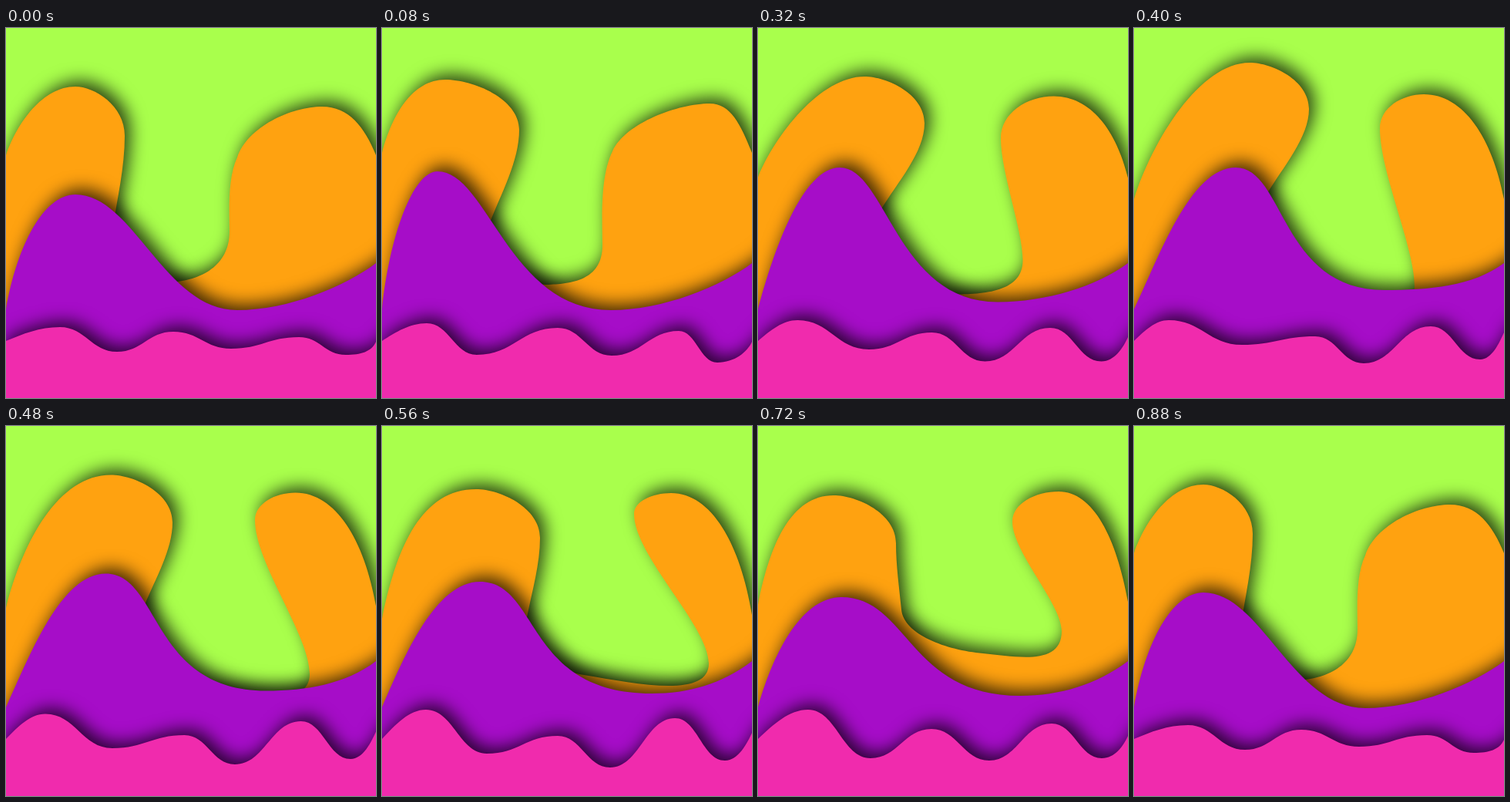
Animation of 480x480 px, one loop 960 ms. Source, as an HTML page:

```html
<!DOCTYPE html>
<html lang="en">
<head>
<meta charset="utf-8">
<title>Paper waves</title>
<style>
html, body { margin: 0; width: 100%; height: 100%; overflow: hidden; background: #a9ff4c; }
svg { display: block; width: 100vw; height: 100vh; }
path { filter: drop-shadow(7px -7px 11px rgba(0, 0, 0, .74)); }
</style>
</head>
<body>
<svg viewBox="0 0 480 480">
  <path id="back" fill="#ffa210"/>
  <path id="mid" fill="#a60dc8"/>
  <path id="front" fill="#f02bad"/>
</svg>
<script>
const STEP = 80, STEPS = 12;

// Closes an edge of cubic curves below the stage.
const sheet = (y0, curves, y1) =>
  `M-30 520 L-30 ${y0 + 50} L0 ${y0} C${curves.join(' ')} L510 ${y1 - 25} V520 Z`;

// left y, bulge, crest, overhang, inner turn, valley, corner, neck, second crest, right y
const backPoses = [
  [165, .47, 90, 76, 154, 140, 138, 262, 222, 329, 290, 264, 300, 168, 410, 102, 165],
  [162, .52, 82, 67, 178, 132, 139, 255, 214, 333, 286, 282, 299, 160, 425, 98, 162],
  [165, .4, 126, 81, 205, 142, 145, 258, 210, 331, 323, 268, 311, 156, 391, 91, 167],
  [222, .43, 150, 45, 227, 105, 172, 216, 260, 360, 364, 335, 319, 130, 376, 86, 222],
  [250, .57, 122, 82, 205, 145, 188, 248, 262, 323, 424, 308, 327, 114, 375, 87, 245],
  [232, .56, 98, 90, 179, 152, 186, 238, 292, 295, 394, 266, 330, 124, 390, 85, 228]
];

function back([ya, k, tx, ty, rx, ry, vx, vy, bx, by, cx, cy, lx, ly, sx, sy, ye]) {
  const lean = .4 * (rx - vx);
  const slope = .25 + (cy - by) * .0055;
  const tilt = 1.3 * Math.max(0, lx - cx);
  const inB = .45 * (bx - vx), outB = .42 * (cx - bx);
  return sheet(ya, [
    .16 * tx, ya - k * (ya - ty), tx - k * tx, ty, tx, ty,
    tx + .38 * (rx - tx), ty, rx, ry - .62 * (ry - ty), rx, ry,
    rx, ry + .33 * (vy - ry), vx + lean, vy - .33 * (vy - ry), vx, vy,
    vx - lean, vy + .57 * (by - vy), bx - inB, by - slope * inB, bx, by,
    bx + outB, by + slope * outB, cx, cy + 46, cx, cy,
    cx, cy - .25 * (cy - ly), lx - tilt, ly + .28 * (cy - ly), lx, ly,
    lx + tilt, ly - .6 * (ly - sy), sx - Math.min(40, .5 * (sx - lx)), sy, sx, sy,
    sx + .5 * (480 - sx), sy, 465, ye - .58 * (ye - sy), 480, ye
  ], ye + 100);
}

// crest, valley, handle share on either side of the slope
const midPoses = [
  [90, 216, 300, 366, .36, .45],
  [72, 186, 297, 366, .29, .59],
  [80, 181, 297, 371, .26, .585],
  [132, 181, 325, 340, .33, .7],
  [127, 202, 350, 347, .35, .74],
  [108, 222, 340, 350, .375, .625]
];

function mid([tx, ty, bx, by, p, q]) {
  const w = bx - tx;
  return sheet(365, [
    tx * tx / 550, 240 + .45 * tx, .55 * tx, ty, tx, ty,
    tx + p * w, ty, bx - q * w, by, bx, by,
    bx + .37 * (480 - bx), by, 440, 335, 480, 305
  ], 305);
}

// three crests and troughs in turn, then right y
const frontPoses = [
  [70, 388, 144, 420, 217, 394, 292, 416, 380, 401, 441, 424, 407],
  [58, 383, 123, 424, 228, 389, 298, 425, 385, 393, 435, 434, 407],
  [58, 379, 148, 423, 216, 390, 291, 430, 373, 391, 442, 435, 407],
  [45, 379, 140, 411, 235, 400, 298, 435, 385, 387, 449, 430, 395],
  [57, 368, 136, 425, 228, 402, 296, 443, 380, 379, 445, 434, 398],
  [65, 368, 146, 431, 225, 393, 300, 434, 381, 386, 446, 431, 402]
];

function front(p) {
  let [x, y] = p;
  const ye = p[12];
  const curves = [.31 * x, 406 - .5 * (406 - y), .62 * x, y, x, y];
  for (let i = 2; i < 12; i += 2) {
    const h = .45 * (p[i] - x);
    curves.push(x + h, y, p[i] - h, p[i + 1], p[i], p[i + 1]);
    [x, y] = [p[i], p[i + 1]];
  }
  curves.push(x + .5 * (480 - x), y, 474, ye + 13, 480, ye);
  return sheet(406, curves, ye);
}

function blend(poses, u) {
  const i = Math.floor(u), a = poses[i % 6], b = poses[(i + 1) % 6];
  return a.map((v, n) => v + (b[n] - v) * (u - i));
}

const layers = [['back', back, backPoses], ['mid', mid, midPoses], ['front', front, frontPoses]]
  .map(([id, shape, poses]) => [document.getElementById(id), shape, poses]);

let shown = -1;
function draw(now) {
  const step = Math.floor((now + .5) / STEP) % STEPS;
  if (step !== shown) {
    shown = step;
    // The first pose lasts one step, later ones get an in-between.
    const u = step ? (step + 1) / 2 : 0;
    for (const [el, shape, poses] of layers) el.setAttribute('d', shape(blend(poses, u)));
  }
  requestAnimationFrame(draw);
}
draw(0);
</script>
</body>
</html>
```
